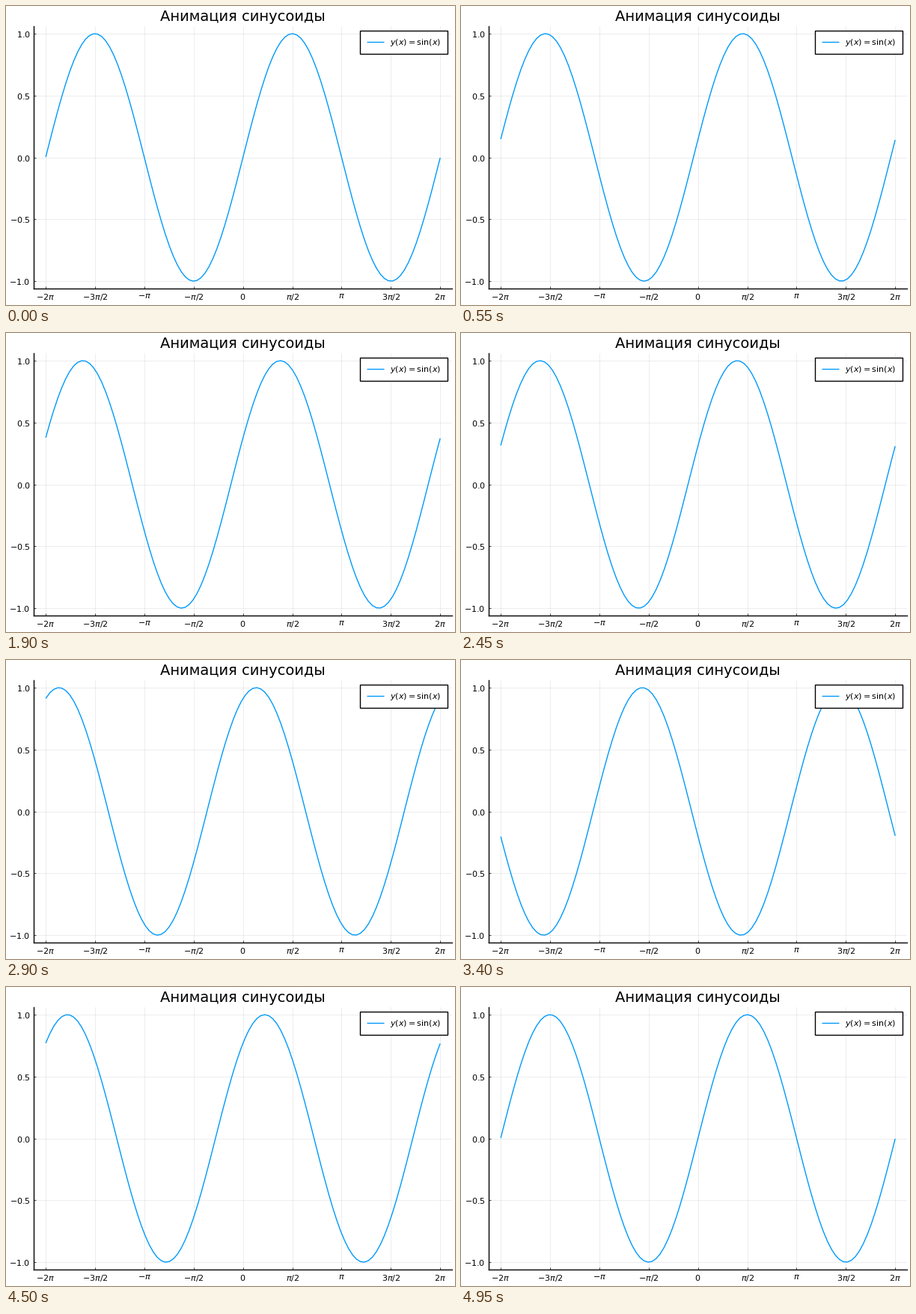
Write a matplotlib script that moves like this. It is 600x400 px and loops after 5000 ms.

```python
import numpy as np
import matplotlib.pyplot as plt
from matplotlib.animation import FuncAnimation

W, H, DPI = 600, 400, 100
FRAMES, INTERVAL = 100, 50
SWING = 10          # amplitude of the phase swing, radians
MARGIN = 0.03
BLUE = "#009AFA"

plt.rcParams.update({
    "font.family": "DejaVu Sans",
    "font.size": 8,
    "mathtext.fontset": "dejavusans",
})

x = np.linspace(-6.28, 6.28, 100)


def wave(i):
    t = 2 * np.pi * i / (FRAMES - 1)
    return np.sin(x + SWING * np.sin(t))


def padded(values):
    lo, hi = values.min(), values.max()
    pad = MARGIN * (hi - lo)
    return lo - pad, hi + pad


fig = plt.figure(figsize=(W / DPI, H / DPI), dpi=DPI, facecolor="white")
left, right, top, bottom = 37.3, 596.0, 27.1, 378.0
ax = fig.add_axes([left / W, 1 - bottom / H, (right - left) / W, (bottom - top) / H])

ax.set_title("Анимация синусоиды", fontsize=14, pad=5.4)
ax.set_xlim(*padded(x))
ax.set_xticks(np.arange(-4, 5) * np.pi / 2,
              [r"$-2\pi$", r"$-3\pi/2$", r"$-\pi$", r"$-\pi/2$", "$0$",
               r"$\pi/2$", r"$\pi$", r"$3\pi/2$", r"$2\pi$"])
y_ticks = np.linspace(-1, 1, 5)
ax.set_yticks(y_ticks, [f"${v:.1f}$" for v in y_ticks])
ax.tick_params(direction="in", width=0.5, length=2.5, labelsize=8)
ax.set_axisbelow(True)
ax.grid(color="black", alpha=0.1, linewidth=0.5)

for side in ("top", "right"):
    ax.spines[side].set_visible(False)
for side in ("left", "bottom"):
    ax.spines[side].set_linewidth(1)

line, = ax.plot(x, wave(0), color=BLUE, linewidth=1,
                solid_capstyle="butt", label=r"$y(x) = \sin(x)$")

legend = ax.legend(loc="upper right", fontsize=8, borderpad=0.8,
                   fancybox=False, framealpha=1, edgecolor="black")
legend.get_frame().set_linewidth(1)


def update(i):
    y = wave(i)
    line.set_ydata(y)
    ax.set_ylim(*padded(y))
    return line,


anim = FuncAnimation(fig, update, frames=FRAMES, interval=INTERVAL,
                     init_func=lambda: update(0), repeat=True, repeat_delay=0)
plt.show()
```
